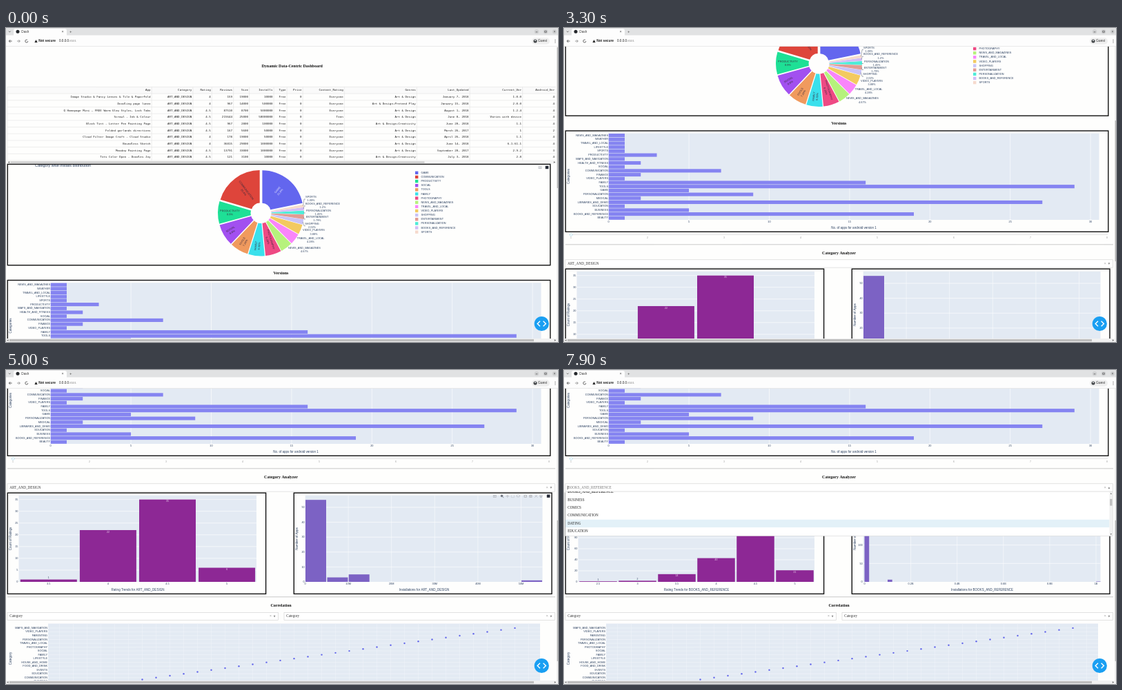
These frames come from a looping animation (800x455 px, 8000 ms). An HTML page with a canvas:

```html
<!DOCTYPE html>
<html lang="en">
<head>
<meta charset="utf-8">
<title>Dash</title>
<style>
html, body { margin: 0; width: 100%; height: 100%; overflow: hidden; background: #fefefe; }
canvas { display: block; width: 800px; height: 455px; }
</style>
</head>
<body>
<canvas id="stage" width="800" height="455"></canvas>
<script>
const g = document.getElementById('stage').getContext('2d');
const LOOP = 8000;
const SANS = '"Liberation Sans", Arial, sans-serif';
const SERIF = '"Liberation Serif", Times, serif';
const MONO = '"DejaVu Sans Mono", monospace';
const INK = '#2a3f5f', PLOT = '#e3eaf3';
const list = s => s.split('|');

// Scroll position of the page over time
const SCROLL = [[900, 0], [1200, 59], [1800, 193.5], [3200, 193.5], [3300, 216.5], [3400, 232],
  [4000, 232], [4100, 247.5], [4700, 387.5]];

const COLUMNS = [
  ['App', 209.5, 'Image Studio & Fancy Lenses & Tile & PaperFold|Doodling page luneo|Q Homepage Mini – FREE Warm Glow Styles, Lock Tabs|Scrawl - Ink & Colour|Block Tint - Letter Pen Painting Page|Folded garlands directions|Cloud Filter Image Craft - Cloud Studio|Boundless Sketch|Meadow Painting Page|Tots Color Open - Doodles Joy'],
  ['Category', 269.3, 'ART_AND_DESIGN'],
  ['Rating', 296.7, '4|4|4.5|4.5|4.5|4.5|4|4|4.5|4.5'],
  ['Reviews', 328, '159|967|87510|215644|967|167|178|36815|13791|121'],
  ['Size', 351, '19000|14000|8700|25000|2800|5600|19000|29000|33000|3100'],
  ['Installs', 386.5, '10000|500000|5000000|50000000|100000|50000|50000|1000000|1000000|10000'],
  ['Type', 405.5, 'Free'],
  ['Price', 428.5, '0'],
  ['Content_Rating', 488.7, 'Everyone|Everyone|Everyone|Teen|Everyone|Everyone|Everyone|Everyone|Everyone|Everyone'],
  ['Genres', 593.7, 'Art & Design|Art & Design;Pretend Play|Art & Design|Art & Design|Art & Design;Creativity|Art & Design|Art & Design|Art & Design|Art & Design|Art & Design;Creativity'],
  ['Last_Updated', 670.5, 'January 7, 2018|January 15, 2018|August 1, 2018|June 8, 2018|June 20, 2018|March 26, 2017|April 26, 2018|June 14, 2018|September 20, 2017|July 3, 2018'],
  ['Current_Ver', 747, '1.0.0|2.0.0|1.2.4|Varies with device|1.1|1|1.1|6.1.61.1|2.9.2|2.8'],
  ['Android_Ver', 795, '4|4|4|4|4|2|4|4|3|4']
].map(([name, right, cells]) => ({ name, right, cells: list(cells) }));

const SLICES = [
  ['GAME', 21.8, '#6366ee'], ['COMMUNICATION', 20.4, '#de453b'], ['PRODUCTIVITY', 8.9, '#1ee096'],
  ['SOCIAL', 8.6, '#a250f0'], ['TOOLS', 7.24, '#f09a5e'], ['FAMILY', 6.39, '#3ae0ec'],
  ['PHOTOGRAPHY', 6.28, '#ee4a84'], ['NEWS_AND_MAGAZINES', 4.67, '#b6f27c'],
  ['TRAVEL_AND_LOCAL', 4.28, '#f986fa'], ['VIDEO_PLAYERS', 3.88, '#f3ca60'],
  ['SHOPPING', 2.02, '#c9c3f8'], ['ENTERTAINMENT', 1.79, '#e29c94'],
  ['PERSONALIZATION', 1.45, '#4eecd8'], ['BOOKS_AND_REFERENCE', 1.2, '#d2bcf6'], ['SPORTS', 1.09, '#f6dacd']
];
// Label centres of the slices from index 7 on
const OUTER = [[432.5, 318.7], [441.5, 305], [446, 293.2], [443.5, 283.7], [451, 274], [453, 265], [459, 254.8], [442, 245]];
// Text distance from the centre for the slices before index 7
const INNER = [41, 39, 45, 50, 49, 48, 41];

const VERSIONS = list('NEWS_AND_MAGAZINES 1|WEATHER 1|TRAVEL_AND_LOCAL 1|LIFESTYLE 1|SPORTS 1|PRODUCTIVITY 3|MAPS_AND_NAVIGATION 1|HEALTH_AND_FITNESS 2|SOCIAL 1|COMMUNICATION 7|FINANCE 2|VIDEO_PLAYERS 1|FAMILY 16|TOOLS 29|GAME 5|PERSONALIZATION 9|MEDICAL 2|LIBRARIES_AND_DEMO 27|EDUCATION 1|BUSINESS 5|BOOKS_AND_REFERENCE 19|BEAUTY 1')
  .map(s => s.split(' '));
const OPTIONS = list('ART_AND_DESIGN|AUTO_AND_VEHICLES|BEAUTY|BOOKS_AND_REFERENCE|BUSINESS|COMICS|COMMUNICATION|DATING|EDUCATION|ENTERTAINMENT');
const MATRIX = list('MAPS_AND_NAVIGATION|VIDEO_PLAYERS|PARENTING|PERSONALIZATION|TRAVEL_AND_LOCAL|PHOTOGRAPHY|SOCIAL|FAMILY|LIFESTYLE|HOUSE_AND_HOME|FOOD_AND_DRINK|EVENTS|EDUCATION|COMMUNICATION|BUSINESS');

const RATINGS = [
  { left: 18.5, x: 61.8, dx: 86.1, bar: 82, unit: 3.41, step: 5, max: 35, labels: ['3.5', '4', '4.5', '5'], values: [1, 22, 35, 6] },
  { left: 20.5, x: 49.5, dx: 57, bar: 54.5, unit: 0.8, step: 20, max: 140, labels: ['2.5', '3', '3.5', '4', '4.5', '5'], values: [1, 2, 14, 43, 149, 21] }
];
const INSTALLS = [
  { x: 433.5, dx: 62.6, unit: 2.16, step: 10, max: 50, ticks: ['0', '10M', '20M', '30M', '40M', '50M'],
    bars: [[434, 30, 55], [465.5, 30, 3], [496.7, 30, 5], [747, 30, 1]] },
  { x: 435.5, dx: 67.1, unit: 0.534, step: 50, max: 200, ticks: ['0', '0.2B', '0.4B', '0.6B', '0.8B', '1B'],
    bars: [[435.5, 6.7, 223], [469, 6.7, 6], [771, 6.5, 1]] }
];

function rect(x, y, w, h, color) { g.fillStyle = color; g.fillRect(x, y, w, h); }

function line(color, width, ...p) {
  g.strokeStyle = color;
  g.lineWidth = width;
  g.beginPath();
  for (let i = 0; i < p.length; i += 2) g.lineTo(p[i], p[i + 1]);
  g.stroke();
}

function disc(x, y, r, color) {
  g.fillStyle = color;
  g.beginPath();
  g.arc(x, y, r, 0, 7);
  g.fill();
}

function frame(x, y, w, h, color, width) {
  g.strokeStyle = color;
  g.lineWidth = width;
  g.strokeRect(x, y, w, h);
}

function clip(x, y, w, h) { g.beginPath(); g.rect(x, y, w, h); g.clip(); }

// Type is set ten times larger and scaled down to keep exact advances
function text(s, x, y, size, { color = INK, align = 'left', font = SANS, weight = '', turn = 0 } = {}) {
  g.save();
  g.translate(x, y);
  g.rotate(turn);
  g.scale(0.1, 0.1);
  g.font = `${weight} ${size * 10}px ${font}`;
  g.textAlign = align;
  g.textBaseline = 'middle';
  g.fillStyle = color;
  g.fillText(s, 0, 0);
  g.restore();
}
const label = (s, x, y, align = 'center', color = INK) => text(s, x, y, 3.87, { align, color });
const axis = (s, x, y, turn = 0) => text(s, x, y, 4.52, { align: 'center', turn });
const heading = (s, y, x = 398.5) => text(s, x, y, 6.04, { align: 'center', font: SERIF, weight: 'bold', color: '#111' });
const serif = (s, x, y, weight, color = '#333') => text(s, x, y, 5.16, { font: SERIF, weight, color });
const panel = (x, y, w) => frame(x, y, w, 146.3, '#111', 1.4);

function modebar(x, y, full) {
  const grey = '#b4b8bf';
  frame(x - 2, y - 1.2, 4, 2.8, grey, 0.8);
  disc(x, y + 0.2, 0.8, grey);
  if (full) {
    disc(x + 10.3, y - 0.3, 1.8, '#777c86');
    line('#777c86', 0.9, x + 11.5, y + 1, x + 13, y + 2.5);
    line(grey, 0.8, x + 16, y, x + 21, y);
    line(grey, 0.8, x + 18.5, y - 2.5, x + 18.5, y + 2.5);
    g.setLineDash([1, 0.8]);
    frame(x + 24, y - 2, 4.2, 4, grey, 0.7);
    g.setLineDash([]);
    g.beginPath();
    g.ellipse(x + 34, y - 0.4, 2.5, 1.7, 0, 0, 7);
    g.stroke();
    for (const dx of [42.3, 50]) rect(x + dx, y - 2, 4.2, 4, grey);
    line('#fff', 0.7, x + 43.2, y, x + 45.7, y);
    line('#fff', 0.7, x + 44.4, y - 1.2, x + 44.4, y + 1.2);
    line('#fff', 0.7, x + 51, y, x + 53.4, y);
    line(grey, 0.8, x + 58, y - 2, x + 62, y + 2);
    line(grey, 0.8, x + 62, y - 2, x + 58, y + 2);
    line(grey, 1, x + 64.6, y, x + 67, y - 2, x + 69.4, y);
    rect(x + 65.5, y, 3, 2, grey);
  }
  rect(x + (full ? 75.5 : 7.7), y - 2.2, 4.6, 4.4, '#262b38');
}

function table() {
  const top = 85.4, row = 9.69;
  rect(2, top, 795, row, '#fafafa');
  for (let i = 0; i < 12; i++) line('#dcdcdc', 0.5, 2, top + i * row, 797, top + i * row);
  line('#dcdcdc', 0.5, 2, top, 2, top + 11 * row);
  for (const { name, right, cells } of COLUMNS) {
    const style = { font: MONO, align: 'right', color: '#222' };
    if (right < 790) line('#dcdcdc', 0.5, right + 1.6, top, right + 1.6, top + 11 * row);
    text(name, right, top + row / 2, 4.19, style);
    for (let i = 0; i < 10; i++) text(cells[i] || cells[0], right, top + row * (i + 1.52), 4.19, style);
  }
  rect(2, 192.6, 795, 4, '#f3f3f3');
  rect(6.5, 193.4, 600, 2.2, '#c9c9c9');
  arrow(4, 194.5, -1, 0);
  arrow(795, 194.5, 1, 0);
}

function arrow(x, y, dx, dy, size = 1.2, color = '#666') {
  g.fillStyle = color;
  g.beginPath();
  g.moveTo(x + dx * size, y + dy * size);
  g.lineTo(x - dx * size + dy * size, y - dy * size + dx * size);
  g.lineTo(x - dx * size - dy * size, y - dy * size - dx * size);
  g.fill();
}

function pie() {
  const cx = 369.5, cy = 268, up = -Math.PI / 2, sum = SLICES.reduce((a, s) => a + s[1], 0);
  let edge = up + SLICES[0][1] / sum * 2 * Math.PI;
  SLICES.forEach(([name, share, color], i) => {
    const next = edge - share / sum * 2 * Math.PI, mid = (edge + next) / 2;
    const ux = Math.cos(mid), uy = Math.sin(mid), x = cx + 3 * ux, y = cy + 3 * uy;
    g.fillStyle = color;
    g.beginPath();
    g.arc(x, y, 59.5, next, edge);
    g.arc(x, y, 12, edge, next, true);
    g.fill();
    if (i < 7) {
      const ink = i ? '#3a2a3c' : '#e8e8ff';
      g.save();
      g.translate(cx + INNER[i] * ux, cy + INNER[i] * uy);
      g.rotate(ux < 0 ? mid + Math.PI : mid);
      label(name, 0, -2.4, 'center', ink);
      label(share + '%', 0, 2.6, 'center', ink);
      g.restore();
    } else {
      const [lx, ly] = OUTER[i - 7];
      if (i > 9) line('#555d70', 0.5, cx + 62 * ux, cy + 62 * uy, 432, ly + 3, 434, ly + 3);
      label(name, lx, ly);
      label(share + '%', lx, ly + 5.3);
    }
    rect(593, 207.6 + i * 6.13, 4.4, 4.4, color);
    label(name, 601.5, 209.8 + i * 6.13, 'left');
    edge = next;
  });
}

function versions() {
  rect(65, 369.2, 710.5, 125.3, PLOT);
  for (let n = 0; n <= 30; n += 5) {
    const x = 64.7 + n * 23.28;
    if (n) line('#fff', 0.6, x, 369.2, x, 494.5);
    label(n, x, 497.8);
  }
  VERSIONS.forEach(([name, n], i) => {
    const y = 372.1 + i * 5.7;
    rect(64.7, y - 2.55, n * 23.28, 5.1, '#8584f1');
    label(name, 64, y, 'right');
  });
  axis('No. of apps for android version 1', 420, 506.2);
  axis('Categories', 6.3, 431.5, -Math.PI / 2);
  panel(2.3, 365.5, 786.5);
  line('#e6e6e6', 1, 10, 516, 788, 516);
  for (let i = 0; i < 8; i++) text(i + 1, 10 + i * 111, 521, 3.5, { align: 'center', color: '#999' });
  disc(10.3, 516, 2.1, '#96cfe8');
  disc(10.3, 516, 1.5, '#fff');
}

function yTicks({ step, max, unit }, left, right) {
  for (let n = 0; n <= max; n += step) {
    const y = 694.5 - n * unit;
    if (n) line('#fff', 0.6, left, y, right, y);
    label(n, left - 1, y + 0.2, 'right');
  }
}

function ratings(c, name) {
  rect(c.left, 569.3, 363 - c.left, 125.2, PLOT);
  yTicks(c, c.left, 363);
  c.values.forEach((n, i) => {
    const x = c.x + i * c.dx, h = n * c.unit, inside = h > 8;
    rect(x - c.bar / 2, 694.5 - h, c.bar, h, '#8d2895');
    text(n, x, 694.5 - h + (inside ? 2.7 : -2.6), 3.4, { align: 'center', color: inside ? '#f3e4f5' : INK });
    label(c.labels[i], x, 697.8);
  });
  axis('Rating Trends for ' + name, 192 - (c.left < 20 ? 1 : 0), 706.3);
  axis('Count of Ratings', 6.3, 632, -Math.PI / 2);
  panel(2.3, 565.6, 374.3);
}

function installs(c, name) {
  rect(433.7, 569.3, 343.8, 125.2, PLOT);
  yTicks(c, 433.7, 777.5);
  c.ticks.forEach((s, i) => {
    const x = c.x + i * c.dx;
    if (i) line('#fff', 0.5, x, 569.3, x, 694.5);
    label(s, x, 697.8);
  });
  for (const [x, w, n] of c.bars) rect(x, 694.5 - n * c.unit, w, n * c.unit, '#7c62c4');
  axis('Installations for ' + name, 606, 706.3);
  axis('Number of Apps', 421.6, 632, -Math.PI / 2);
  panel(417.3, 565.6, 373.7);
}

function dropdown(x, y, w, value, { focus, open } = {}) {
  rect(x, y, w, 11.3, '#fff');
  frame(x, y, w, 11.3, focus ? '#2b9fe6' : '#cfcfcf', focus ? 0.8 : 0.6);
  serif(value, x + 3.2, y + 5.8, '', open ? '#777' : '#333');
  if (open) line('#222', 0.6, x + 3.2, y + 3, x + 3.2, y + 8.5);
  text('×', x + w - 11, y + 5.7, 5, { color: '#999', align: 'center' });
  arrow(x + w - 5.4, y + 5.8, 0, open ? -1 : 1, 1.4, '#888');
}

function menu(hover, selected, offset) {
  const top = 563.6, h = 64.6, pitch = 11.34;
  g.save();
  clip(2, top, 793.5, h);
  rect(2, top, 793.5, h, '#fff');
  OPTIONS.forEach((name, i) => {
    const y = top + i * pitch - offset;
    if (i === hover) rect(2, y, 788.5, pitch, '#e3f1f8');
    serif(name, 5.2, y + pitch / 2, i === selected ? 'bold' : '', '#222');
  });
  rect(790.5, top, 4.6, h, '#f1f1f1');
  rect(791.2, top + 5 + offset * 0.15, 3.2, 9.7, '#bdbdbd');
  arrow(792.8, top + 2.8, 0, -1, 1);
  arrow(792.8, top + h - 2.8, 0, 1, 1);
  g.restore();
  frame(2, top, 793.3, h, '#cfcfcf', 0.5);
}

function correlation() {
  rect(61, 755, 713, 90, PLOT);
  for (let i = -1; i < 34; i++) line('#eff3f9', 0.5, 737.5 - i * 20, 755, 737.5 - i * 20, 845);
  MATRIX.forEach((name, i) => {
    const y = 761.4 + i * 5.53;
    line('#f3f6fb', 0.5, 61, y, 774, y);
    label(name, 60, y, 'right');
  });
  for (let i = 0; i < 28; i++) disc(737.5 - i * 20, 761.4 + i * 2.765, 1.2, '#6468ea');
  axis('Category', 6.3, 805.5, -Math.PI / 2);
}

function scrollAt(t) {
  let [t0, y0] = SCROLL[0];
  for (const [t1, y1] of SCROLL) {
    if (t < t1) return t1 === t0 ? y0 : y0 + (y1 - y0) * (t - t0) / (t1 - t0);
    [t0, y0] = [t1, y1];
  }
  return y0;
}

function page(t, scroll) {
  const chosen = t < 6300 ? 0 : 3, shown = t < 6500 ? 0 : 1, name = OPTIONS[shown ? 3 : 0];
  const first = t >= 5500 && t < 6300, second = t >= 7100;
  heading('Dynamic Data-Centric Dashboard', 55.3, 414.7);
  table();
  text('Category wise installs distribution', 42, 199.6, 5.48);
  pie();
  panel(2.3, 197.4, 786.5);
  if (t < 700) modebar(774, 202, false);
  heading('Versions', 355.2);
  versions();
  if (t >= 3500 && t < 4300) modebar(706.3, 369.6, true);
  line('#bbb', 0.8, 2, 530.3, 796, 530.3);
  heading('Category Analyzer', 542.7);
  ratings(RATINGS[shown], name);
  installs(INSTALLS[shown], name);
  if (t >= 4600 && t < 5300 || t >= 6500) modebar(708.3, 570.2, true);
  dropdown(2, 552.3, 793.3, OPTIONS[chosen], { focus: t >= 6300 && t < 7100, open: first || second });
  line('#bbb', 0.8, 2, 716.3, 796, 716.3);
  heading('Correlation', 729.2);
  dropdown(2, 738.8, 392.5, 'Category');
  dropdown(403, 738.8, 392.3, 'Category');
  correlation();
  if (first) menu(Math.max(0, Math.min(3, Math.floor((t - 5500) / 100) - 1)), 0, 0);
  if (second) {
    const offset = 38.7 * Math.max(0, Math.min(1, (t - 7200) / 300));
    menu(t < 7700 ? 3 : 5 + (t - 7700) / 100, 3, offset);
  }
}

function browser(scroll) {
  rect(0, 0, 800, 11, '#e1e2e3');
  g.fillStyle = '#fdfdfd';
  g.beginPath();
  g.roundRect(11, 1, 77, 11, [3, 3, 0, 0]);
  g.fill();
  rect(0, 10.5, 800, 16, '#fdfdfd');
  line('#dedede', 0.6, 0, 26.5, 800, 26.5);
  const dark = '#444';
  line(dark, 0.8, 4, 4.6, 5.3, 5.9, 6.6, 4.6);
  disc(17, 5.3, 2.5, '#25282c');
  text('Dash', 22.3, 5.3, 4.7, { color: '#333' });
  text('×', 82, 5.3, 5.5, { color: dark, align: 'center' });
  text('+', 93.7, 5.3, 6, { color: dark, align: 'center' });
  for (const x of [769, 782, 795]) disc(x, 5.3, 3.2, '#d0d1d2');
  line(dark, 0.7, 767.7, 5.8, 770.3, 5.8);
  frame(780.8, 4.2, 2.4, 2.3, dark, 0.6);
  text('×', 795, 5.3, 5, { color: dark, align: 'center' });
  line(dark, 0.8, 8.6, 19, 4.3, 19);
  line(dark, 0.8, 6.3, 17, 4.3, 19, 6.3, 21);
  line('#888', 0.8, 16, 19, 20.3, 19);
  line('#888', 0.8, 18.3, 17, 20.3, 19, 18.3, 21);
  g.strokeStyle = dark;
  g.beginPath();
  g.arc(29.8, 19, 2, 0, 5.3);
  g.stroke();
  arrow(31.5, 17.3, 0.7, 0.7, 1, dark);
  arrow(43.5, 19, 0, -1, 2.1, '#222');
  text('Not secure', 47.2, 19, 4.8, { color: '#222', weight: 'bold' });
  text('0.0.0.0', 77, 19, 4.6, { color: '#222' });
  text(':8501', 91, 19, 4.4, { color: '#888' });
  g.fillStyle = '#efefef';
  g.beginPath();
  g.roundRect(762, 14.3, 26, 9.4, 4.7);
  g.fill();
  disc(767, 19, 2.5, '#3c4043');
  disc(767, 18.2, 0.9, '#fff');
  text('Guest', 771, 19, 4.9, { color: '#333' });
  for (const y of [17, 19, 21]) disc(796, y, 0.55, dark);

  rect(798, 26.8, 2, 424, '#f1f1f1');
  rect(798.6, 28 + scroll * 0.49, 1.4, 204, '#b9b9b9');
  rect(0, 450, 800, 5, '#f1f1f1');
  rect(5, 450.9, 760, 3.2, '#bcbcbc');
  arrow(2.3, 452.5, -1, 0);
  arrow(796, 452.5, 1, 0);
  disc(776.3, 428.5, 10.6, '#1a9ff2');
  line('#fff', 1.4, 774, 424.8, 770.2, 428.5, 774, 432.2);
  line('#fff', 1.4, 778.6, 424.8, 782.4, 428.5, 778.6, 432.2);
}

function draw(now) {
  const t = Math.floor(now % LOOP / 100) * 100, scroll = scrollAt(t);
  rect(0, 0, 800, 455, '#fefefd');
  g.save();
  clip(0, 26.5, 798, 424);
  g.translate(0, -scroll);
  page(t, scroll);
  g.restore();
  browser(scroll);
  requestAnimationFrame(draw);
}
requestAnimationFrame(draw);
</script>
</body>
</html>
```
